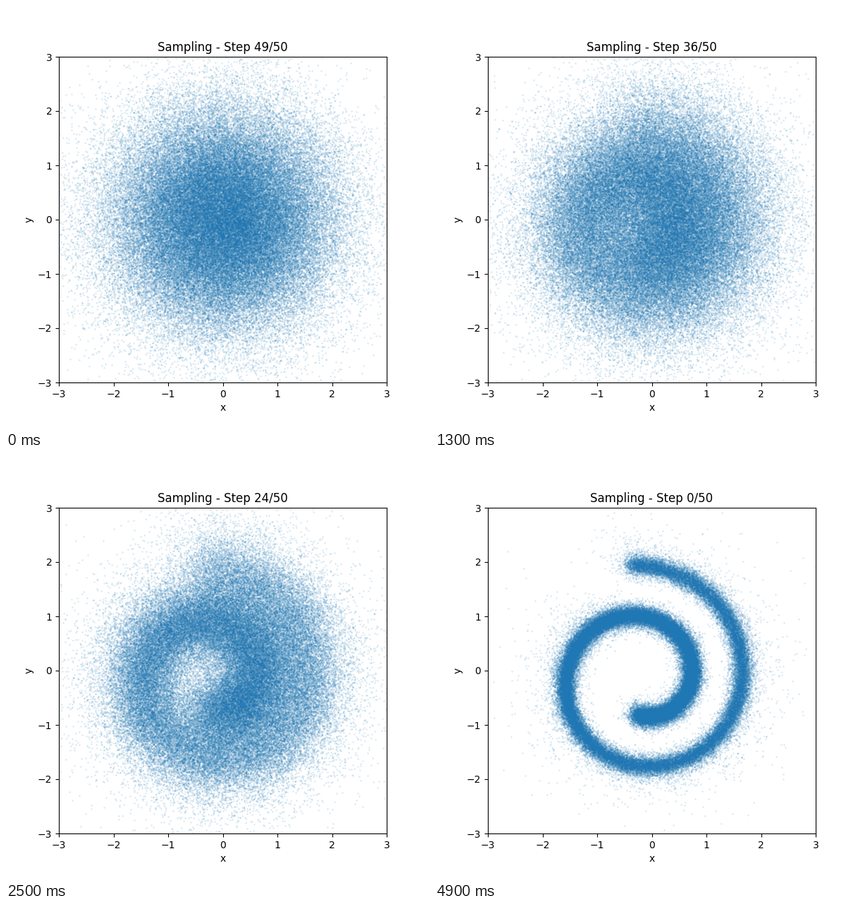
A matplotlib script for the animation above (5 s loop, 600 px wide and 600 px high).

```python
import matplotlib.pyplot as plt
import numpy as np
from matplotlib.animation import FuncAnimation

STEPS = 50
POINTS = 100_000
ROLL_NOISE = 0.08
NOISE_LIMIT = 2.0
GRID_N, GRID_EXTENT = 101, 4.0

rng = np.random.default_rng(7)
betas = np.linspace(1e-4, 0.02, STEPS)
alpha_bars = np.cumprod(1 - betas)


def spiral(count):
    """Centre line of a standardised Swiss roll."""
    t = np.linspace(1.47 * np.pi, 4.52 * np.pi, count)
    x = 0.97 * (t * np.cos(t) - 2.0) / 6.62 + 0.10
    y = 1.02 * (t * np.sin(t) - 0.21) / 6.95 - 0.11
    return np.column_stack([x, y]).astype(np.float32)


curve = spiral(240)
axis = np.linspace(-GRID_EXTENT, GRID_EXTENT, GRID_N, dtype=np.float32)
grid = np.stack(np.meshgrid(axis, axis, indexing="ij"), axis=-1).reshape(-1, 2)


def denoised_grid(scale, variance):
    """Expected clean position for a noisy sample at every grid node."""
    centres = (scale * curve).astype(np.float32)
    logits = grid @ centres.T - 0.5 * (centres ** 2).sum(axis=1)
    logits /= np.float32(variance)
    logits -= logits.max(axis=1, keepdims=True)
    weights = np.exp(logits)
    means = weights @ centres / weights.sum(axis=1, keepdims=True)
    return means.reshape(GRID_N, GRID_N, 2)


def bilinear(field, points):
    pos = (points + GRID_EXTENT) * (GRID_N - 1) / (2 * GRID_EXTENT)
    pos = np.clip(pos, 0, GRID_N - 1.001)
    cell = pos.astype(int)
    i, j = cell.T
    u, v = (pos - cell).T[:, :, None]
    low = field[i, j] * (1 - v) + field[i, j + 1] * v
    high = field[i + 1, j] * (1 - v) + field[i + 1, j + 1] * v
    return low * (1 - u) + high * u


def predicted_noise(points, bar):
    """Noise estimate, softly limited in size like a trained network's."""
    variance = 1 - bar + bar * ROLL_NOISE ** 2
    mean = bilinear(denoised_grid(np.sqrt(bar), variance), points)
    noise = np.sqrt(1 - bar) * (points - mean) / variance
    size = np.linalg.norm(noise, axis=1, keepdims=True) / NOISE_LIMIT + 1e-9
    return noise * np.tanh(size) / size


def sample():
    """Reverse diffusion from pure noise; returns the cloud after each step."""
    points = rng.standard_normal((POINTS, 2))
    clouds = []
    for step in reversed(range(STEPS)):
        beta, bar = betas[step], alpha_bars[step]
        drift = beta / np.sqrt(1 - bar) * predicted_noise(points, bar)
        points = (points - drift) / np.sqrt(1 - beta)
        if step > 0:
            points = points + np.sqrt(beta) * rng.standard_normal(points.shape)
        clouds.append(points.astype(np.float32))
    return clouds


clouds = sample()

fig, ax = plt.subplots(figsize=(6, 6), dpi=100)
dots = ax.scatter(*clouds[0].T, s=1, alpha=0.1, color="tab:blue")
ax.set(xlim=(-3, 3), ylim=(-3, 3), xlabel="x", ylabel="y")
title = ax.set_title("")


def update(frame):
    dots.set_offsets(clouds[frame])
    title.set_text(f"Sampling - Step {STEPS - 1 - frame}/{STEPS}")
    return dots, title


anim = FuncAnimation(fig, update, frames=STEPS, interval=100,
                     repeat=True, repeat_delay=0, blit=False)
plt.show()
```
